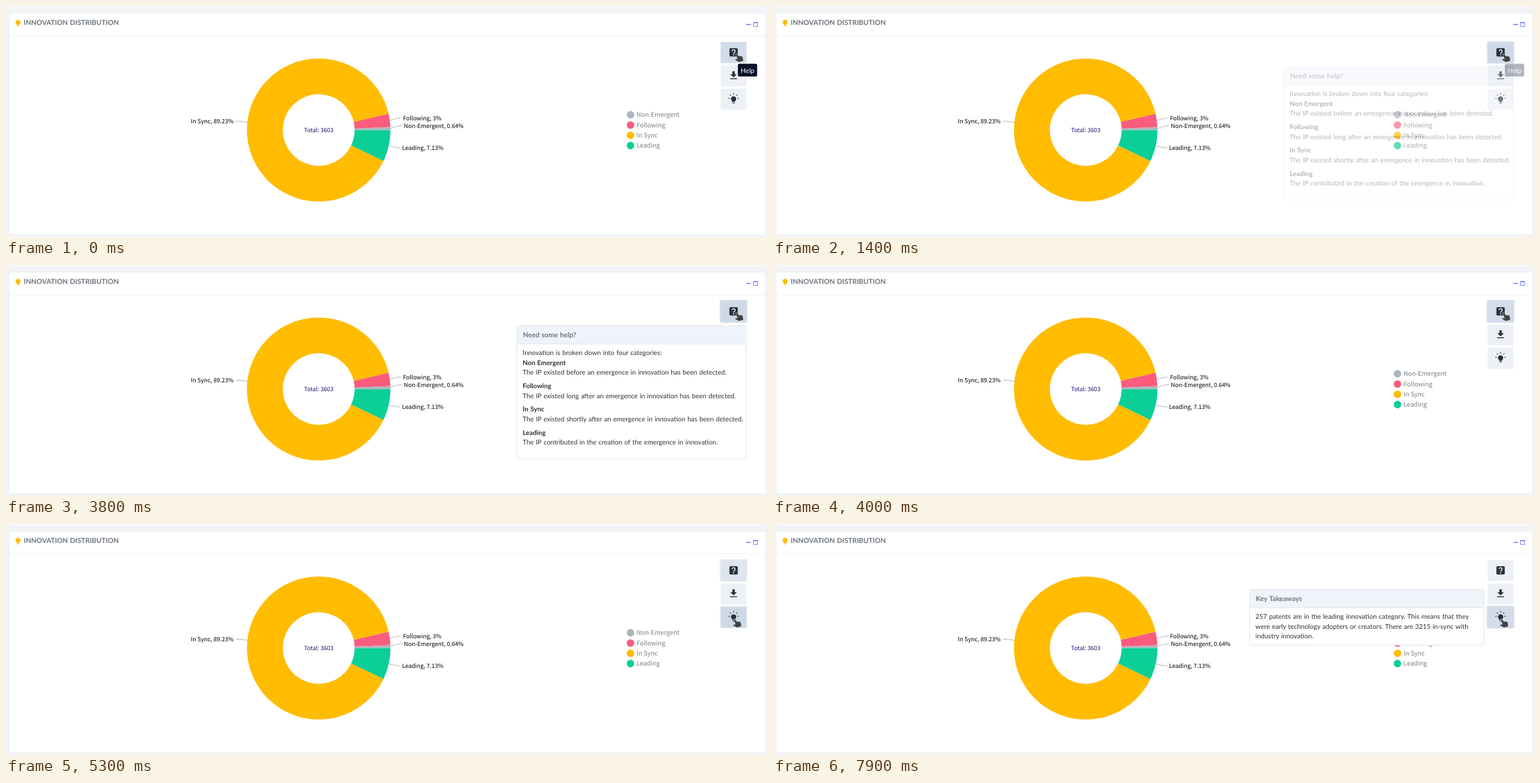
These frames come from a looping animation (1280x390 px, 8 s). An HTML page:

```html
<!DOCTYPE html>
<html lang="en">
<head>
<meta charset="utf-8">
<title>Innovation distribution</title>
<style>
html, body { margin: 0; width: 100%; height: 100%; overflow: hidden; background: #f3f4f7; }
svg { display: block; width: 100%; height: 100%; }
text { font-family: Lato, sans-serif; font-size: 11.15px; word-spacing: .66px; fill: #2c3036; text-rendering: geometricPrecision; white-space: pre; }
.chart text { font-family: "Noto Sans CJK JP", "Noto Sans CJK SC", "Noto Sans CJK", sans-serif; font-size: 9.85px; word-spacing: 0; fill: #000; }
.chart .legend text { font-size: 10.6px; fill: #7d7d7d; }
.chart .total { fill: #12126e; text-anchor: middle; }
.chart polyline { fill: none; stroke: #9a9a9a; stroke-width: .8; }
.bold { font-weight: 700; }
.head { font-weight: 700; font-size: 11.6px; fill: #6c757d; }
.icon { fill: #28303c; }
</style>
</head>
<body>
<svg id="stage" viewBox="0 0 1280 390">
  <defs>
    <filter id="soft" x="-5%" y="-10%" width="110%" height="120%"><feGaussianBlur stdDeviation="3"/></filter>
    <path id="bulb" d="M-4.6 -1.2A4.6 4.6 0 1 1 2.4 2.7V4.2H-2.4V2.7A4.6 4.6 0 0 1 -4.6 -1.2ZM-2.2 5.1H2.2V6.4H-2.2Z"/>
  </defs>
  <rect width="1280" height="390" fill="#f3f4f7"/>
  <rect x="6" y="-6" width="1271" height="7.5" rx="3" fill="#fff"/>
  <rect x="6" y="14" width="1271" height="371" fill="#e9ebf0" opacity=".6" filter="url(#soft)"/>
  <rect x="6" y="13" width="1271" height="372" rx="3" fill="#fff"/>
  <path d="M6 50.5H1277" stroke="#f1f2f5"/>
  <use href="#bulb" transform="translate(20.3 28.6) scale(.9)" fill="#ffbc00"/>
  <text class="head" x="29.8" y="32.2" style="font-size:11.7px">INNOVATION DISTRIBUTION</text>
  <g fill="none" stroke="#727cf5">
    <path d="M1245 31.2H1253" stroke-width="1.6"/>
    <rect x="1257.5" y="27.8" width="6.6" height="6.6"/>
    <path d="M1257 28H1264.6" stroke-width="1.6"/>
  </g>
  <g class="chart" id="chart"></g>
  <g id="buttons"></g>
  <g id="help"></g>
  <g id="takeaways"></g>
  <g id="tip">
    <rect x="1231" y="97.5" width="32.4" height="21.5" rx="2.5" fill="#06122a"/>
    <text x="1235.8" y="112.6" style="fill:#fff;font-size:11.1px">Help</text>
  </g>
  <path id="hand" d="M-1.4 .8Q-.6 -1 1 .2L4.4 4.4L8.4 4.2Q10.8 4.6 11.2 7.4L12 12.6L4.6 14.6L-1.6 11.4Q-2.6 9.8 -.6 9L2 9.4Z" fill="#414141" stroke="#dfe4ea" stroke-width=".5" stroke-linejoin="round"/>
</svg>
<script>
const LOOP = 8000, STEP = 100;
const el = id => document.getElementById(id);
const text = (x, y, s, cls = '') => `<text class="${cls}" x="${x}" y="${y}">${s}</text>`;

// Donut, clockwise from three o'clock
const CX = 526, CY = 209.4, R = 120.7, HOLE = 60.4;
const GREY = '#acb4bd', PINK = '#fa5c7c', AMBER = '#ffbc00', GREEN = '#0acf97';
const polar = (r, share) => {
  const a = share * 2 * Math.PI;
  return `${(CX + r * Math.cos(a)).toFixed(2)} ${(CY + r * Math.sin(a)).toFixed(2)}`;
};
const slice = (from, to, fill) => {
  const big = to - from > .5 ? 1 : 0;
  return `<path fill="${fill}" d="M${polar(R, from)}A${R} ${R} 0 ${big} 1 ${polar(R, to)}` +
    `L${polar(HOLE, to)}A${HOLE} ${HOLE} 0 ${big} 0 ${polar(HOLE, from)}Z"/>`;
};
const line = pts => `<polyline points="${pts}"/>`;
const legend = [['Non-Emergent', GREY], ['Following', PINK], ['In Sync', AMBER], ['Leading', GREEN]]
  .map(([name, fill], i) => {
    const y = 183.6 + i * 17.35;
    return `<circle cx="1050.4" cy="${y}" r="6.3" fill="${fill}"/>` + text(1060.6, y + 3.8, name);
  }).join('');

el('chart').innerHTML =
  slice(0, .0713, GREEN) + slice(.0713, .9636, AMBER) +
  slice(.9636, .9936, PINK) + slice(.9936, 1, GREY) +
  line('387,194.5 392,194.5 406.2,196.4') + line('664,189.3 659,189.3 645.6,193.2') +
  line('666,202.4 660,202.4 646.6,206.8') + line('663,239.4 658,239.4 643.7,236.3') +
  text(311, 197.9, 'In Sync, 89.23%') + text(667.8, 193.1, 'Following, 3%') +
  text(669.3, 205.8, 'Non-Emergent, 0.64%') + text(666.2, 242.9, 'Leading, 7.13%') +
  text(CX, 213, 'Total: 3603', 'total') + `<g class="legend">${legend}</g>`;

// Tool buttons
let rays = '';
for (let a = -90; a <= 90; a += 45)
  rays += `<path d="M0 -6.6V-8.8" transform="translate(0 -1.4) rotate(${a})" stroke="#28303c" stroke-width="1.3"/>`;
const icons = [
  `<rect x="-7" y="-7" width="14" height="14" rx="1.8"/>
   <path d="M-2.5 -1.9A2.5 2.5 0 1 1 1.5 .1Q0 1.1 0 2.3" fill="none" stroke="#e4eaf2" stroke-width="1.6"/>
   <rect x="-.9" y="3.5" width="1.8" height="1.8" fill="#e4eaf2"/>`,
  `<path d="M-2 -7.5H2V-2.6H5.6L0 2.6L-5.6 -2.6H-2ZM-5.8 4.2H5.8V5.8H-5.8Z"/>`,
  `<use href="#bulb" transform="translate(0 .8) scale(.96)"/>` + rays
];
const tops = [60.8, 100.4, 139.8];
el('buttons').innerHTML = icons.map((icon, i) => `<g id="b${i}">
  <rect class="ring" x="1200.3" y="${tops[i] - 2}" width="47" height="39" rx="3" fill="#dfe3ea"/>
  <rect class="face" x="1202" y="${tops[i]}" width="43.5" height="35.4" rx="1.2"/>
  <g class="icon" transform="translate(1223.8 ${tops[i] + 17.4})">${icon}</g></g>`).join('');
const buttons = tops.map((_, i) => ({
  ring: el('b' + i).querySelector('.ring'),
  face: el('b' + i).querySelector('.face')
}));

// Popovers
const popover = (x, y, w, h, arrow, title, rows) =>
  `<rect x="${x}" y="${y}" width="${w}" height="${h}" rx="2.5" fill="#fff" stroke="#dee2e6"/>
   <path d="M${x + .5} ${y + 30.5}V${y + 2.5}Q${x + .5} ${y + .5} ${x + 2.5} ${y + .5}H${x + w - 2.5}Q${x + w - .5} ${y + .5} ${x + w - .5} ${y + 2.5}V${y + 30.5}Z" fill="#eff3fa"/>
   <path d="M${x} ${y + 30.8}H${x + w}" stroke="#dee2e6" stroke-width=".9"/>
   <path d="${arrow}" fill="#fff" stroke="#d5d9df" stroke-width=".8"/>` +
  text(x + 10.2, y + 19.8, title, 'head') +
  rows.map(([dy, s, cls]) => text(x + 9.8, y + dy, s, cls)).join('');

el('help').innerHTML = popover(859.3, 102.6, 385.8, 224.6, 'M1206.5 102.6L1212 97.2L1217.5 102.6', 'Need some help?', [
  [49.3, 'Innovation is broken down into four categories:'],
  [66, 'Non Emergent', 'bold'],
  [82.5, 'The IP existed before an emergence in innovation has been detected.'],
  [105.3, 'Following', 'bold'],
  [122, 'The IP existed long after an emergence in innovation has been detected.'],
  [144.8, 'In Sync', 'bold'],
  [161.4, 'The IP existed shortly after an emergence in innovation has been detected.'],
  [184.3, 'Leading', 'bold'],
  [200.8, 'The IP contributed in the creation of the emergence in innovation.']
]);
el('takeaways').innerHTML = popover(801.7, 110.6, 393.8, 94, 'M1195.5 151.8L1200.8 157.3L1195.5 162.8', 'Key Takeaways', [
  [49.3, '257 patents are in the leading innovation category. This means that they'],
  [66, 'were early technology adopters or creators. There are 3215 in-sync with'],
  [82.4, 'industry innovation.']
]);

// Stepped tracks: [time, value] holds until the next entry
const at = (track, t) => track.reduce((v, k) => t >= k[0] ? k[1] : v, track[0][1]);
const IDLE = '#edf1f6', HOVER = '#d3dcea', PRESS = '#cdd9e6', FADE = '#dfe5ee';
const tipTrack = [[0, 1], [1300, .6], [1400, .3], [1500, .12], [1600, .02], [3800, 0]];
const helpTrack = [[0, 0], [1400, .35], [1500, .85], [1600, 1], [3900, .5], [4000, 0]];
const keyTrack = [[0, 0], [5400, .6], [5500, 1]];
const faces = [
  [[0, HOVER], [1300, PRESS], [1500, HOVER], [3800, PRESS], [4000, HOVER], [5300, FADE], [5400, IDLE]],
  [[0, IDLE], [4500, FADE], [4600, HOVER], [4700, FADE], [4800, IDLE]],
  [[0, IDLE], [4800, FADE], [4900, HOVER], [5300, PRESS], [5400, HOVER]]
];
const rings = [
  [[0, 0], [1300, .2], [1400, .7], [1500, 1], [5300, .5], [5400, 0]],
  [[0, 0]],
  [[0, 0], [5300, .4], [5400, 1]]
];
const handTrack = [
  [0, [1228.3, 80.2]], [4400, [1229, 88]], [4500, [1231, 105]], [4600, [1232, 129]],
  [4700, [1231.2, 153.6]], [4800, [1227, 163]], [4900, [1225, 160.3]]
];

function draw(ms) {
  const t = Math.floor(ms % LOOP / STEP) * STEP;
  const help = at(helpTrack, t);
  el('tip').setAttribute('opacity', at(tipTrack, t));
  el('help').setAttribute('opacity', help);
  el('takeaways').setAttribute('opacity', at(keyTrack, t));
  buttons.forEach((b, i) => {
    b.face.setAttribute('fill', at(faces[i], t));
    b.ring.setAttribute('opacity', at(rings[i], t));
    if (i) el('b' + i).setAttribute('opacity', help === 1 ? 0 : 1);
  });
  el('hand').setAttribute('transform', `translate(${at(handTrack, t)})`);
}

let start;
function tick(now) {
  start ??= now;
  draw(now - start);
  requestAnimationFrame(tick);
}
draw(0);
requestAnimationFrame(tick);
</script>
</body>
</html>
```
